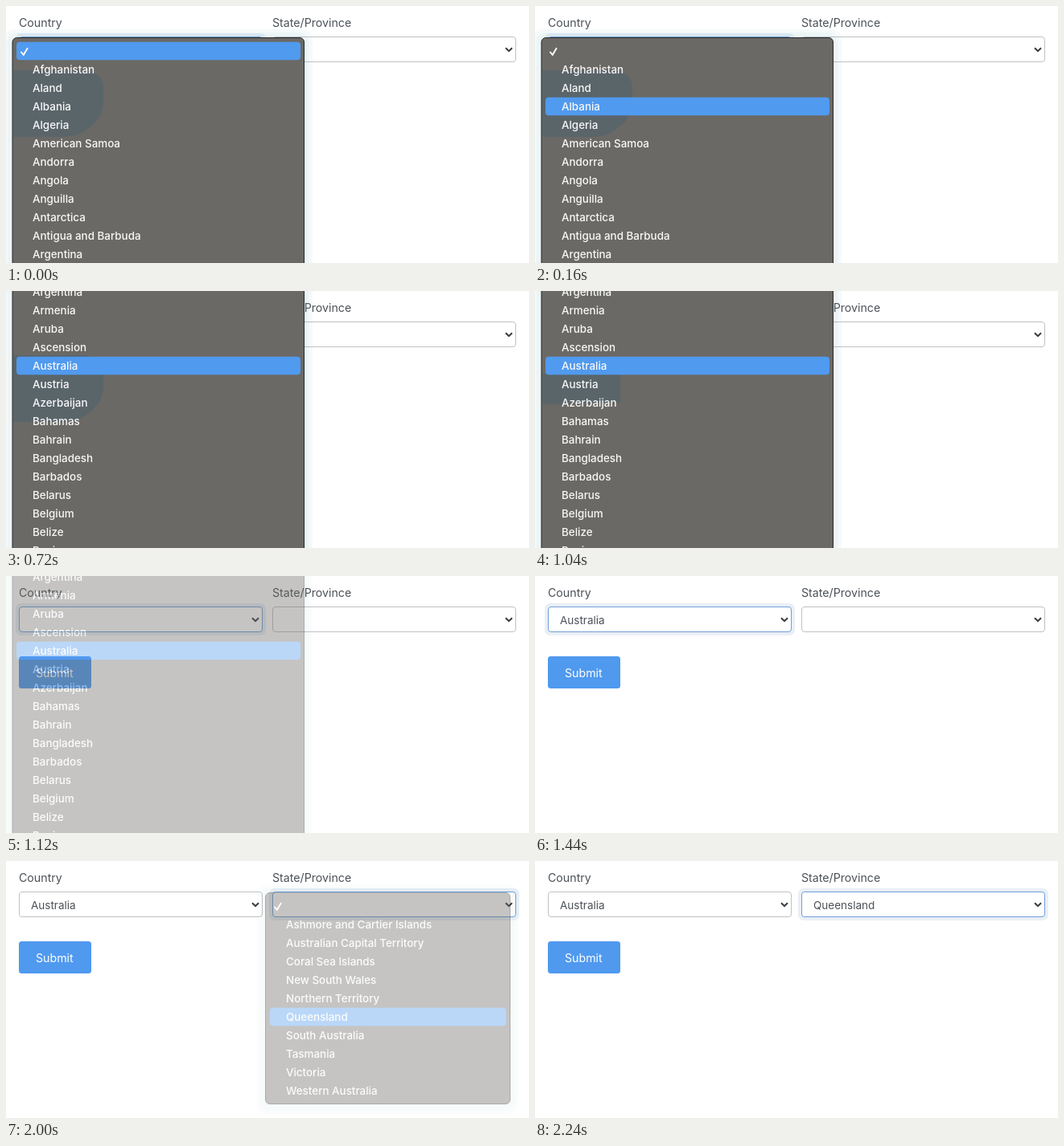
Recreate the animation shown at these times as an HTML page. Size 650 by 320 pixels, loop 2.4 s.

```html
<!DOCTYPE html>
<html lang="en">
<head>
<meta charset="utf-8">
<title>Country and state pickers</title>
<style>
  html, body { margin: 0; width: 100%; height: 100%; overflow: hidden; background: #fff; }
  svg { display: block; font-family: Inter, Roboto, sans-serif; }
  .label { font-size: 14.2px; fill: #4b5157; }
  .value { font-size: 13.5px; fill: #4b5157; }
  .item { font-size: 13.4px; font-weight: 500; fill: #f8f8f8; }
  .tick { fill: none; stroke: #fff; stroke-width: 1.9; stroke-linecap: round; }
  .halo { fill: #3c82aa; fill-opacity: .045; }
</style>
</head>
<body>
<svg id="stage" width="650" height="320" viewBox="0 0 650 320"></svg>
<script>
const STEP = 80, LOOP = 2400, ROW = 23, TOP = 39;
const stage = document.getElementById('stage');

const countries = ['', 'Afghanistan', 'Aland', 'Albania', 'Algeria', 'American Samoa', 'Andorra',
  'Angola', 'Anguilla', 'Antarctica', 'Antigua and Barbuda', 'Argentina', 'Armenia', 'Aruba',
  'Ascension', 'Australia', 'Austria', 'Azerbaijan', 'Bahamas', 'Bahrain', 'Bangladesh',
  'Barbados', 'Belarus', 'Belgium', 'Belize', 'Benin'];
const states = ['', 'Ashmore and Cartier Islands', 'Australian Capital Territory',
  'Coral Sea Islands', 'New South Wales', 'Northern Territory', 'Queensland',
  'South Australia', 'Tasmania', 'Victoria', 'Western Australia'];

// Per-step values; the last one holds
const scrolls = [0, 0, 0, 40, 120, 198, 270, 308];
const pointer = [56, 96, 134, 134, 134, 134, 134, 134, 116, 93];
const stateRows = [0, 3, 6];
const hold = (list, i) => list[Math.min(i, list.length - 1)];

function add(parent, tag, attrs, text = '') {
  const node = document.createElementNS('http://www.w3.org/2000/svg', tag);
  set(node, attrs);
  node.textContent = text;
  return parent.appendChild(node);
}
function set(node, attrs) {
  for (const key in attrs) node.setAttribute(key, attrs[key]);
}
const show = (node, on) => set(node, { visibility: on ? 'visible' : 'hidden' });

function makeSelect(x, label) {
  add(stage, 'text', { x, y: 26, class: 'label' }, label);
  const glow = add(stage, 'rect', { x: x - 4, y: 34, width: 311, height: 40, rx: 7, fill: '#e9eff6' });
  const box = add(stage, 'rect', { x: x + .5, y: 38.5, width: 302, height: 31, rx: 3.5, fill: '#fff' });
  const value = add(stage, 'text', { x: x + 15, y: 60, class: 'value' });
  add(stage, 'path', { d: `M${x + 290} 52.2l4 4 4-4`, fill: 'none', stroke: '#343a40', 'stroke-width': 2 });
  return (text, focus) => {
    show(glow, focus);
    set(box, { stroke: focus ? '#6f9fd8' : '#bfc1c3' });
    value.textContent = text;
  };
}

function makeMenu(x, width, height, items, textX, inset) {
  const root = add(stage, 'g', {});
  const halos = [10, 6].map(pad => ({ pad,
    node: add(root, 'rect', { x: x - pad, width: width + 2 * pad, rx: 12, class: 'halo' }) }));
  const panel = add(root, 'rect', { x: x + .5, width: width - 1, rx: 5.5, fill: '#6b6965', stroke: '#27282a' });
  const tint = add(root, 'path', { fill: '#5a656a' });
  const bar = add(root, 'rect', { x: x + inset, width: width - 2 * inset + .5, height: ROW - .5, rx: 4, fill: '#509aef' });
  const list = add(root, 'g', {});
  add(list, 'path', { d: `M${textX - 14} 57.5l2.8 3.3 4.8-8`, class: 'tick' });
  items.forEach((name, i) => add(list, 'text', { x: textX, y: 61 + ROW * i, class: 'item' }, name));

  return ({ opacity, row, lit, scroll = 0, patch = '' }) => {
    show(root, opacity > 0);
    set(root, { opacity });
    const y = Math.max(TOP - scroll, -20), bottom = TOP + height;
    set(panel, { y: y + .5, height: bottom - y - 1 });
    for (const { pad, node } of halos) set(node, { y: y - pad, height: bottom - y + 2 * pad + 2 });
    set(tint, { d: patch });
    set(bar, { y: 44.7 + ROW * row - scroll, opacity: lit ? 1 : 0 });
    set(list, { transform: `translate(0 ${-scroll})` });
  };
}

add(stage, 'rect', { x: 16, y: 100, width: 90, height: 40, rx: 3.5, fill: '#4f99ef' });
add(stage, 'text', { x: 37, y: 126, class: 'label', style: 'fill:#fff' }, 'Submit');
const country = makeSelect(16, 'Country');
const province = makeSelect(331, 'State/Province');
const countryMenu = makeMenu(7.5, 363.5, 700, countries, 33, 5.5);
const stateMenu = makeMenu(322, 305, 264, states, 348, 6);

const softPatch = 'M9 80H100Q121 84 121 102V122Q119 140 105 150Q92 163 70 163H9Z';
const sharpPatch = 'M9 103H106V139H40V141H9Z';

// Menus blink off, on, then fade while closing
const fade = (n, last) => n < last ? 1 : n === last ? .39 : 0;

function draw(n) {
  const scroll = hold(scrolls, n);
  country(n < 15 ? '' : 'Australia', n < 19);
  province(n < 26 ? '' : 'Queensland', n >= 19);
  countryMenu({
    opacity: fade(n, 14),
    row: Math.floor((hold(pointer, n) - 44.5 + scroll) / ROW),
    lit: n !== 12,
    scroll,
    patch: n < 12 ? softPatch : n < 14 ? sharpPatch : ''
  });
  stateMenu({
    opacity: n < 19 ? 0 : fade(n, 25),
    row: hold(stateRows, Math.max(0, n - 19)),
    lit: n !== 24
  });
}

const start = performance.now();
function tick() {
  draw(Math.floor((performance.now() - start) % LOOP / STEP));
  requestAnimationFrame(tick);
}
tick();
</script>
</body>
</html>
```
